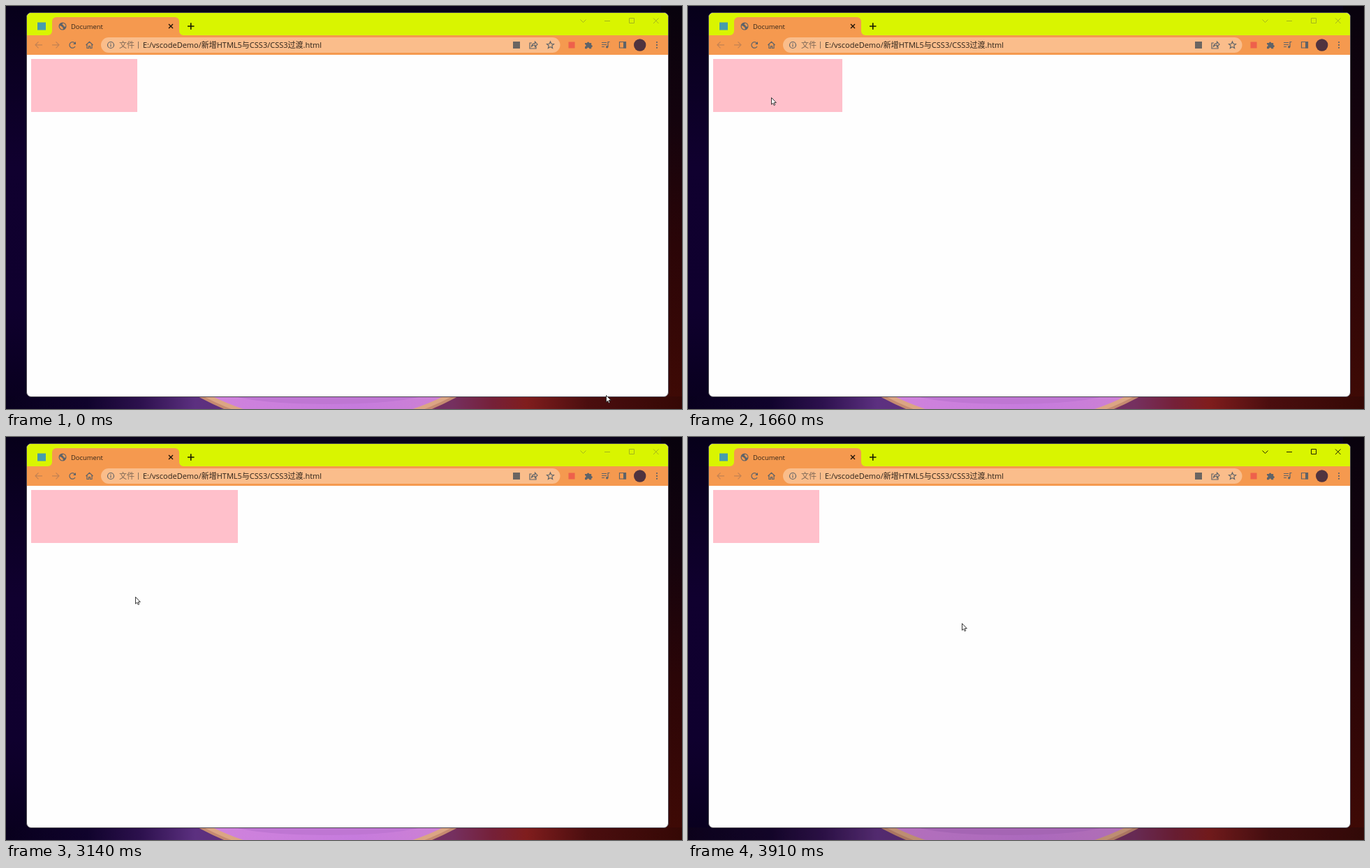
An HTML page that plays this animation: 968 by 578 pixels, repeating every 5.23 s.

```html
<!DOCTYPE html>
<html lang="zh">
<head>
<meta charset="utf-8">
<title>Transition demo</title>
<style>
  html, body { margin: 0; width: 100%; height: 100%; overflow: hidden; background: #08011a; }
  svg { display: block; width: 968px; height: 578px; }
  text { font-family: "Open Sans", "Noto Sans CJK SC", "Noto Sans CJK", sans-serif; }
  .line { fill: none; stroke: #5f6368; stroke-width: 1.2; }
  .pale { stroke: #c48253; }
  .solid { fill: #5f6368; }
</style>
</head>
<body>
<svg viewBox="0 0 968 578">
  <defs>
    <linearGradient id="left" x2="0" y2="1">
      <stop stop-color="#07001a"/><stop offset=".4" stop-color="#10002f"/>
      <stop offset=".75" stop-color="#0f002e"/><stop offset="1" stop-color="#08001d"/>
    </linearGradient>
    <linearGradient id="right" x2="0" y2="1">
      <stop stop-color="#08020d"/><stop offset=".28" stop-color="#14030d"/>
      <stop offset=".6" stop-color="#2b0507"/><stop offset="1" stop-color="#400a05"/>
    </linearGradient>
    <linearGradient id="floor">
      <stop stop-color="#08001d"/><stop offset=".12" stop-color="#10032c"/>
      <stop offset=".2" stop-color="#2d114e"/><stop offset=".28" stop-color="#5c3080"/>
      <stop offset=".66" stop-color="#753060"/><stop offset=".72" stop-color="#752038"/>
      <stop offset=".77" stop-color="#801d1d"/><stop offset=".86" stop-color="#4b0e0f"/>
      <stop offset="1" stop-color="#350805"/>
    </linearGradient>
    <linearGradient id="glow">
      <stop stop-color="#dc90cc"/><stop offset=".3" stop-color="#cf82dc"/>
      <stop offset=".55" stop-color="#c67bdd"/><stop offset="1" stop-color="#d88ac5"/>
    </linearGradient>
    <clipPath id="strip"><path d="M0 560H968V578H0z"/></clipPath>
  </defs>

  <!-- wallpaper -->
  <path fill="#08011a" d="M0 0H968V578H0z"/>
  <path fill="url(#left)" d="M0 0H40V578H0z"/>
  <path fill="url(#right)" d="M938 0H968V578H938z"/>
  <g clip-path="url(#strip)">
    <path fill="url(#floor)" d="M0 560H968V578H0z"/>
    <circle cx="461" cy="223" r="385" fill="#c58a70"/>
    <circle cx="461" cy="222" r="382" fill="#dba584"/>
    <circle cx="461" cy="220" r="378" fill="url(#glow)"/>
    <ellipse cx="461" cy="551" rx="150" ry="20" fill="#bf76d3"/>
    <path id="dim" fill="#201018" opacity=".16" d="M0 560H968V578H0z"/>
  </g>

  <!-- browser window -->
  <rect x="29.5" y="9.5" width="919" height="551" rx="6.500" fill="#fefefe" stroke="#4c4650"/>
  <path fill="#d9f500" d="M30 45V16a6 6 0 0 1 6-6H942a6 6 0 0 1 6 6V45z"/>
  <path fill="#f5994f" d="M30 70V42H60a6 6 0 0 0 6-6V22a6 6 0 0 1 6-6H242a6 6 0 0 1 6 6V36a6 6 0 0 0 6 6H948V70z"/>
  <rect x="45" y="23.5" width="12" height="11" fill="#469cac"/>
  <circle class="solid" cx="81" cy="29" r="5.500"/>
  <path fill="#f5994f" d="M77 28l3 1.500 2 2.500-1 1.500a4.300 4.300 0 0 1-4-5.500zM81.500 24.700l-1 1.800 1.500 1 1 2h2.400a4.500 4.500 0 0 0-3.900-4.800z"/>
  <text x="93" y="33" font-size="9.4" fill="#33251a">Document</text>
  <path stroke="#1c1208" stroke-width="1.4" d="M233 26l6 6m0-6l-6 6"/>
  <path stroke="#151800" stroke-width="1.6" d="M260 29h9.500m-4.750-4.750v9.500"/>
  <path id="controls" fill="none" d="M822.500 19.500l4 4 4-4M857 21.500h8M892.500 17.500h7v7h-7zM927 17.500l7.500 7.500m0-7.500l-7.500 7.500"/>

  <!-- toolbar -->
  <rect x="136" y="45" width="657.500" height="22" rx="11" fill="#fabd8b"/>
  <path class="line pale" d="M52 55.800H42m4.500-4.500L42 55.800l4.500 4.500M66 55.800h10m-4.500-4.500l4.500 4.500-4.500 4.500"/>
  <path class="line" d="M99 58a4.300 4.300 0 1 1-.600-5l1 1"/>
  <path class="solid" d="M100 51v4h-4z"/>
  <path class="line" d="M114.500 56l5-4.700 5 4.700M116 55v5.500h2.500v-3h2v3h2.500V55"/>
  <circle class="line" cx="150" cy="56" r="4.500"/>
  <path class="line" d="M150 55.300v3.200m0-5.300v1.200"/>
  <text x="162" y="60" font-size="11" fill="#7b6655">文件</text>
  <path stroke="#8a715d" d="M189.500 51v10"/>
  <text x="196" y="60" font-size="11" fill="#2b2118">E:/vscodeDemo/新增HTML5与CSS3/CSS3过渡.html</text>
  <rect x="726" y="51" width="10" height="10" fill="#6b6561"/>
  <path class="line" d="M753 53h-3v8h9v-3M752.500 58c.5-3 2.500-4.300 5-4.300v-2.500l3.500 3.700-3.500 3.600v-2.500c-2 0-3.500.5-5 2z"/>
  <path class="line" d="M779.500 51l1.400 3.300 3.600.3-2.700 2.400.8 3.500-3.100-1.900-3.100 1.900.8-3.500-2.700-2.400 3.600-.3z"/>
  <rect x="805.500" y="51.500" width="9" height="9" fill="#ee604b"/>
  <path class="solid" d="M829 53h3a1.600 1.600 0 1 1 3.200 0h3v3a1.600 1.600 0 1 1 0 3.200v2h-3a1.600 1.600 0 0 0-3.200 0h-3v-3a1.600 1.600 0 0 0 0-3.200z"/>
  <path class="line" d="M853 52.500h7m-7 3h7m-7 3h4M862 58.500v-7h2.500"/>
  <circle class="solid" cx="860.700" cy="58.800" r="1.700"/>
  <path class="line" d="M878.500 51.500h9v8.500h-9z"/>
  <path class="solid" d="M884 51h4v9.500h-4z"/>
  <circle cx="907.700" cy="56" r="8.700" fill="#50333f"/>
  <path stroke="#5f6368" stroke-width="2.200" stroke-linecap="round" d="M932 52h.01m0 3.900h-.01m0 3.900h.01"/>

  <rect id="box" x="36" y="76" height="76" fill="#ffc0cb"/>
  <path id="cursor" fill="#fff" stroke="#222" stroke-width=".9" stroke-linejoin="round" d="M.5.5V10.200L2.700 8.200 4.200 11.500 5.700 10.800 4.300 7.600H7.300z"/>
</svg>
<script>
const LOOP = 5230, EASE_MS = 500;
const GROW_AT = 1578, SHRINK_AT = 3108, FOCUS_AT = 3910;
const NARROW = 152, WIDE = 304;
const $ = id => document.getElementById(id);

const home = { x: 859, y: 558 };
const moves = [
  { from: 30, to: 510, x: 7, y: 94 },
  { from: 510, to: 580, x: 38, y: 89 },
  { from: 610, to: 880, x: 119, y: 131 },
  { from: 2060, to: 2140, x: 174, y: 182 },
  { from: 2140, to: 2330, x: 185, y: 229 },
  { from: 3300, to: 3470, x: 200, y: 223 },
  { from: 3470, to: 3660, x: 392, y: 267 }
];

const clamp = v => Math.min(1, Math.max(0, v));
const smooth = v => v * v * (3 - 2 * v);

// CSS "ease": cubic-bezier(.25, .1, .25, 1), solved by bisection
function ease(x) {
  let low = 0, high = 1, s;
  for (let i = 0; i < 20; i++) {
    s = (low + high) / 2;
    if (.75 * s * (1 - s) + s ** 3 < x) low = s; else high = s;
  }
  return .3 * s * (1 - s) ** 2 + 3 * s * s * (1 - s) + s ** 3;
}

const transition = (time, begin) => ease(clamp((time - begin) / EASE_MS));

function pointer(time) {
  return moves.reduce((at, move) => {
    const p = smooth(clamp((time - move.from) / (move.to - move.from)));
    return { x: at.x + (move.x - at.x) * p, y: at.y + (move.y - at.y) * p };
  }, home);
}

function render(time) {
  const open = transition(time, GROW_AT) - transition(time, SHRINK_AT);
  const { x, y } = pointer(time);
  const focused = time >= FOCUS_AT;
  $('box').setAttribute('width', Math.round(NARROW + (WIDE - NARROW) * open));
  $('cursor').setAttribute('transform', `translate(${Math.round(x)} ${Math.round(y)})`);
  $('controls').setAttribute('stroke', focused ? '#202400' : '#a4b51c');
  $('dim').setAttribute('visibility', focused ? 'visible' : 'hidden');
}

const start = performance.now();
function loop() {
  render((performance.now() - start) % LOOP);
  requestAnimationFrame(loop);
}
loop();
</script>
</body>
</html>
```
